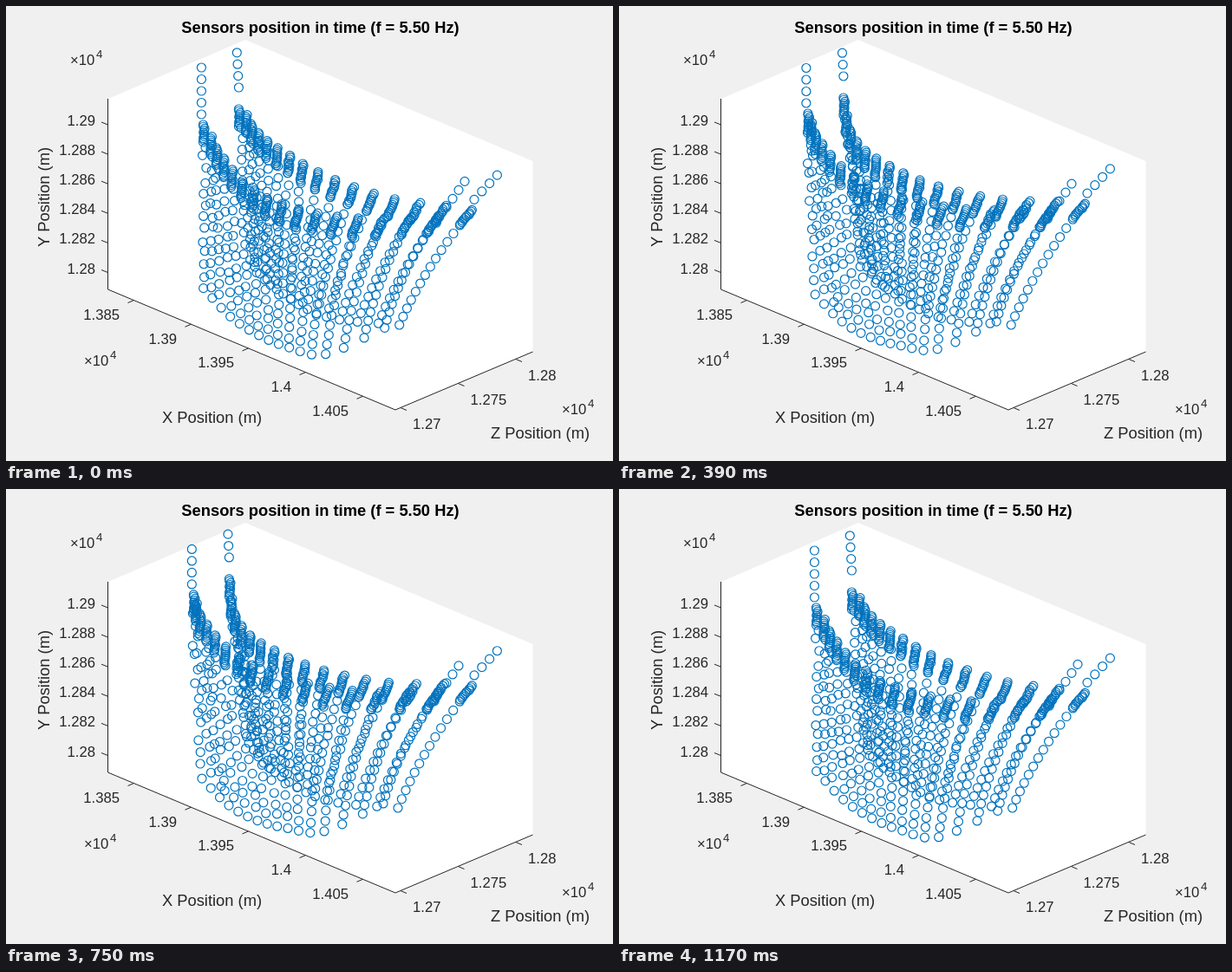
These frames come from a looping animation (700x525 px, 1200 ms). An HTML page with a canvas:

```html
<!DOCTYPE html>
<html>
<head>
<meta charset="utf-8">
<style>
html, body { margin: 0; height: 100%; overflow: hidden; background: #f0f0f0; }
canvas { display: block; }
</style>
</head>
<body>
<canvas id="stage" width="700" height="525"></canvas>
<script>
const ctx = document.getElementById('stage').getContext('2d');
const INK = '#262626', BLUE = '#0072bd';
const FRAME = 30, FRAMES = 40, REST = 0.33;
const COLUMNS = 16, ROWS = 13, CREST_ROWS = 10;

// Each wall: crest and foot curves, sway, and loose points above both end columns.
const walls = [
  {
    crest: [[224, 141], [243, 178], [278, 215], [330, 238], [400, 250], [492, 249]],
    foot: [[227, 329], [258, 361], [291, 381], [326, 393], [368, 399], [436, 368]],
    lift: 4, footSway: -5,
    ends: {
      0: { x: -3, y: -22, dx: 0, dy: -13.5, count: 5, minY: 68 },
      15: { x: 16, y: -20, dx: 7, dy: -10, count: 4, minY: 201 }
    }
  },
  {
    crest: [[265, 123], [283, 161], [319, 188], [372, 214], [442, 233], [531, 240]],
    foot: [[281, 293], [298, 316], [319, 332], [347, 350], [384, 362], [453, 368]],
    lift: -16, footSway: 0,
    ends: {
      0: { x: -1, y: -35, dx: -0.7, dy: -13.4, count: 4, minY: 51 },
      15: { x: 9, y: -20, dx: 8.8, dy: -9.4, count: 4, minY: 183 }
    }
  }
];

// Catmull-Rom curve through the knots, u from 0 to 1.
function along(knots, u) {
  const last = knots.length - 1;
  const i = Math.min(last - 1, Math.floor(u * last)), t = u * last - i;
  return [0, 1].map(axis => {
    const b = knots[i][axis], c = knots[i + 1][axis];
    const a = i > 0 ? knots[i - 1][axis] : 2 * b - c;
    const d = i + 2 <= last ? knots[i + 2][axis] : 2 * c - b;
    return b + t / 2 * (c - a + t * (2 * a - 5 * b + 4 * c - d + t * (3 * (b - c) + d - a)));
  });
}

const noise = n => {
  const s = Math.sin(n * 12.9898) * 43758.5453;
  return (s - Math.floor(s)) * 2 - 1;
};

function buildPoints() {
  const points = [];
  walls.forEach((wall, w) => {
    for (let k = 0; k < COLUMNS; k++) {
      const u = k / (COLUMNS - 1);
      const [tx, ty] = along(wall.crest, u), [bx, by] = along(wall.foot, u);
      const bulge = Math.sin(Math.PI * u ** 0.6);
      const swayX = 6.6 * (1 - u) + 7 * bulge;
      const swayY = 9 - 4 * u + wall.lift * bulge;
      const footY = wall.footSway * Math.cos(Math.PI * u);
      const add = (x, y, v = 0, jitter = 0, minY = 0) => {
        const seed = points.length + 1;
        points.push({
          x, y, minY,
          dx: swayX * (1 - v) + v + jitter * noise(seed),
          dy: swayY * (1 - v) + footY * v + jitter * noise(seed + 0.5)
        });
      };

      const lean = 6.5 * u * u, half = w && k === COLUMNS - 1 ? 8 : 10;
      for (let j = 0; j < CREST_ROWS; j++) {
        const s = 2 * j / (CREST_ROWS - 1) - 1;
        add(tx - lean * s + noise(k + j * 7), ty + half * s);
      }
      for (let j = 1; j <= ROWS; j++) {
        const v = j / ROWS;
        const bow = 24 * u * u * v * (1 - v);
        add(tx + (bx - tx) * v - bow, ty + (by - ty) * v, v, j < ROWS ? 4 * (1 - u) : 0);
      }
      const end = wall.ends[k];
      for (let j = 0; end && j < end.count; j++)
        add(tx + end.x + end.dx * j, ty + end.y + end.dy * j, 0, 0, end.minY);
    }
  });
  return points;
}

function line(...xy) {
  ctx.beginPath();
  for (let i = 0; i < xy.length; i += 2) ctx.lineTo(xy[i], xy[i + 1]);
  ctx.stroke();
}

function text(str, x, y, align = 'center', size = 16.67, weight = '') {
  ctx.font = `${weight} ${size}px "Liberation Sans", Arial, sans-serif`;
  ctx.textAlign = align;
  ctx.fillText(str, x, y);
}

function exponent(x, y) {
  text('×10', x, y, 'left');
  text('4', x + 30, y - 8, 'left', 13.3);
}

function drawAxes() {
  ctx.fillStyle = '#f0f0f0';
  ctx.fillRect(0, 0, 700, 525);
  ctx.fillStyle = '#fff';
  ctx.beginPath();
  ctx.moveTo(118, 107);
  ctx.lineTo(276, 39);
  ctx.lineTo(607.5, 179);
  ctx.lineTo(607.5, 399);
  ctx.lineTo(449, 466);
  ctx.lineTo(118, 327);
  ctx.fill();

  ctx.strokeStyle = ctx.fillStyle = INK;
  ctx.lineWidth = 1;
  line(117.5, 107, 117.5, 327, 449, 466, 607.5, 399);
  ['1.29', '1.288', '1.286', '1.284', '1.282', '1.28'].forEach((label, i) => {
    const y = 137 + 34.1 * i;
    line(117.5, y, 110, y - 3);
    text(label, 103, y + 1, 'right');
  });
  ['1.385', '1.39', '1.395', '1.4', '1.405'].forEach((label, i) => {
    const x = 147.5 + 66 * i, y = 339.5 + 27.7 * i;
    line(x, y, x - 7, y + 3);
    text(label, x - 16.5, y + 22.5, 'right');
  });
  ['1.27', '1.275', '1.28'].forEach((label, i) => {
    const x = 455 + 66.5 * i, y = 463.5 - 28 * i;
    line(x, y, x + 7, y + 3);
    text(label, x + 14, y + 24.5, 'left');
  });
  exponent(74, 68);
  exponent(90, 415);
  exponent(641, 470.5);

  text('X Position (m)', 237.5, 481, 'center', 18.33);
  text('Z Position (m)', 616, 499, 'center', 18.33);
  ctx.save();
  ctx.translate(50, 220.5);
  ctx.rotate(-Math.PI / 2);
  text('Y Position (m)', 0, 0, 'center', 18.33);
  ctx.restore();
  ctx.fillStyle = '#000';
  text('Sensors position in time (f = 5.50 Hz)', 362.5, 31, 'center', 18.33, 'bold');
}

const points = buildPoints();

function draw(now) {
  const step = Math.floor(now / FRAME) % FRAMES;
  const swing = Math.cos(2 * Math.PI * step / (FRAMES - 1) - 0.06) - REST;
  drawAxes();
  ctx.strokeStyle = BLUE;
  ctx.lineWidth = 1.2;
  for (const p of points) {
    const x = p.x + p.dx * swing, y = p.y + p.dy * swing;
    if (y < p.minY) continue;
    ctx.beginPath();
    ctx.arc(x, y, 5, 0, 2 * Math.PI);
    ctx.stroke();
  }
  requestAnimationFrame(draw);
}
requestAnimationFrame(draw);
</script>
</body>
</html>
```
